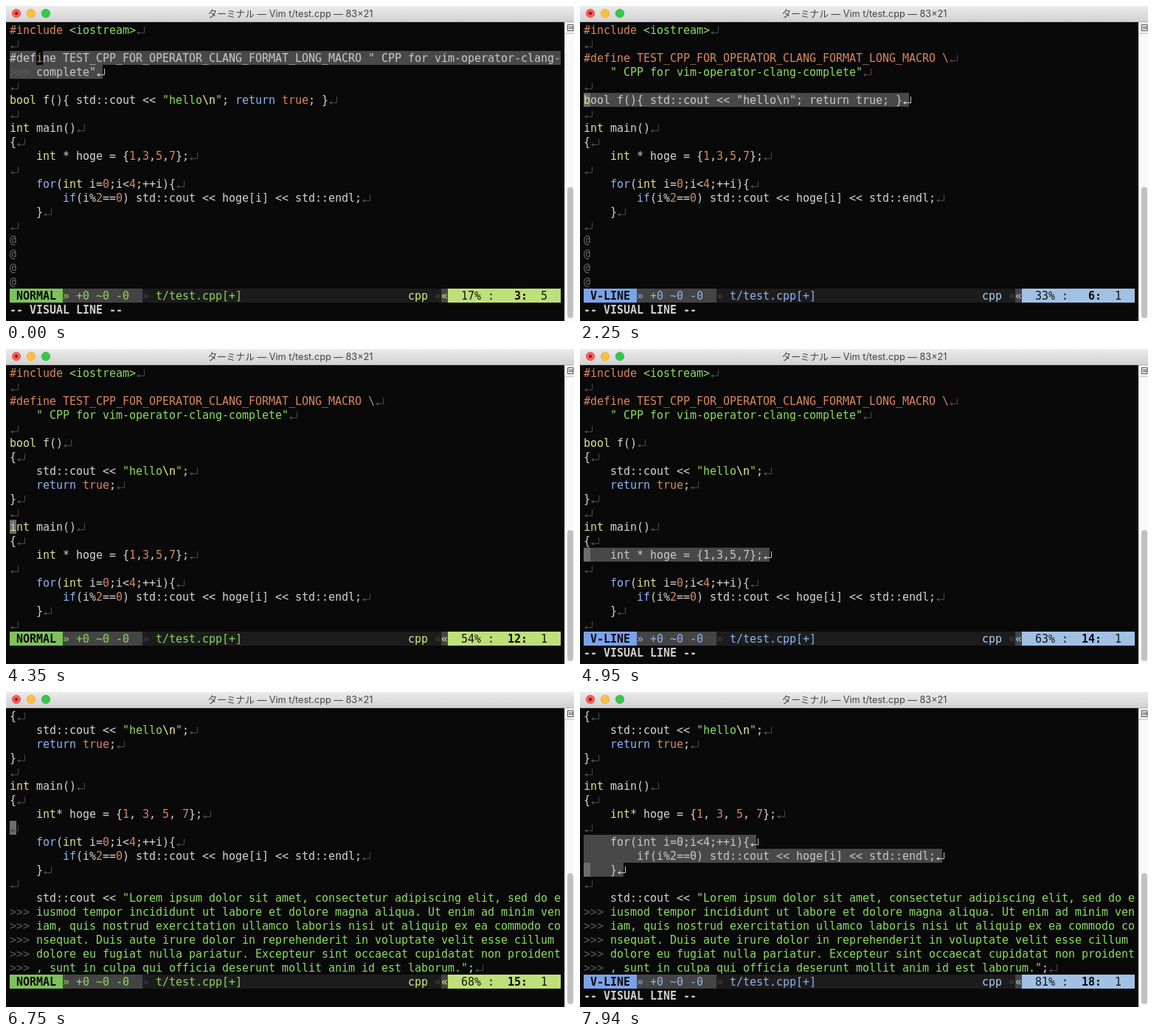
An HTML page that plays this animation: 770 px wide and 428 px high, repeating every 8 s.

```html
<!DOCTYPE html>
<html lang="ja">
<head>
<meta charset="utf-8">
<title>Vim clang-format</title>
<style>
  html, body { margin: 0; width: 100%; height: 100%; overflow: hidden; background: #090909; }
  svg { display: block; width: 770px; height: 428px; }
  #screen text {
    font: 15px "DejaVu Sans Mono", monospace;
    letter-spacing: -0.03px;
    font-variant-ligatures: none;
    white-space: pre;
  }
  #screen .bold { font-weight: bold; }
  #title { font: 12.7px Inter, "Noto Sans CJK JP", sans-serif; fill: #444; text-anchor: middle; }
</style>
</head>
<body>
<svg viewBox="0 0 770 428" width="770" height="428">
  <defs>
    <linearGradient id="bar" x2="0" y2="1">
      <stop offset="0" stop-color="#ebebeb"/>
      <stop offset="1" stop-color="#d2d2d2"/>
    </linearGradient>
  </defs>
  <rect width="770" height="428" fill="#090909"/>
  <g id="screen"></g>

  <rect width="770" height="21" fill="url(#bar)"/>
  <rect y="21" width="770" height="1" fill="#b4b4b4"/>
  <g stroke-width=".6">
    <circle cx="14" cy="10" r="5.8" fill="#fc5b57" stroke="#df4744"/>
    <circle cx="34" cy="10" r="5.8" fill="#fdbe41" stroke="#de9f34"/>
    <circle cx="54" cy="10" r="5.8" fill="#35c84a" stroke="#27aa35"/>
  </g>
  <circle cx="14" cy="10" r="2" fill="#7a0b08"/>
  <text id="title" x="385.5" y="14.5">ターミナル — Vim t/test.cpp — 83×21</text>

  <rect x="757" y="22" width="13" height="406" fill="#f9f9f9"/>
  <rect x="757" y="22" width="1" height="406" fill="#e2e2e2"/>
  <rect x="757" y="22" width="13" height="15" fill="#ececec"/>
  <rect x="757" y="37" width="13" height="1" fill="#c8c8c8"/>
  <path d="M761.5 25.5h7.5v8h-7.5zM763 28.5h6M763 30.5h6" fill="none" stroke="#555"/>
  <rect x="761" y="246" width="8" height="178" rx="4" fill="#c1c1c1"/>
</svg>
<script>
const LOOP = 8000, COLS = 83, ROWS = 19, CW = 9, RH = 19, LEFT = 5, TOP = 23;

const C = {
  bg: '#090909', plain: '#d4d4d4', pre: '#d7875f', type: '#dfdf8f', word: '#8fb4f4',
  str: '#8bdb62', esc: '#f0f0a0', dim: '#4a4a4a', wrap: '#5c5c5c', at: '#6c6c6c',
  sel: '#484848', selText: '#c8c8c8', cursor: '#6c6c6c', mid: '#444', line: '#1c1c1c'
};

const THEMES = {
  NORMAL: { mode: '#7ec25b', text: '#8ad55c', type: '#c8f07c', pos: '#bfe079' },
  'V-LINE': { mode: '#7ba3e8', text: '#8db3ee', type: '#a9cdf2', pos: '#a1c1e4' }
};

const RULES = [
  [/\b(?:int|bool)\b/g, C.type],
  [/\b(?:for|if|return)\b/g, C.word],
  [/\b(?:true|\d+)\b/g, C.pre],
  [/"[^"]*"|<iostream>/g, C.str],
  [/\\n/g, C.esc]
];

const LOREM = 'Lorem ipsum dolor sit amet, consectetur adipiscing elit, sed do eiusmod tempor ' +
  'incididunt ut labore et dolore magna aliqua. Ut enim ad minim veniam, quis nostrud ' +
  'exercitation ullamco laboris nisi ut aliquip ex ea commodo consequat. Duis aute irure ' +
  'dolor in reprehenderit in voluptate velit esse cillum dolore eu fugiat nulla pariatur. ' +
  'Excepteur sint occaecat cupidatat non proident, sunt in culpa qui officia deserunt ' +
  'mollit anim id est laborum.';

const MACRO = '#define TEST_CPP_FOR_OPERATOR_CLANG_FORMAT_LONG_MACRO ';
const MACRO_TEXT = '" CPP for vim-operator-clang-complete"';

// Buffer contents after the given number of formatting steps.
function buffer(step) {
  return [
    '#include <iostream>', '',
    ...(step > 0 ? [MACRO + '\\', '    ' + MACRO_TEXT] : [MACRO + MACRO_TEXT]), '',
    ...(step > 1
      ? ['bool f()', '{', '    std::cout << "hello\\n";', '    return true;', '}']
      : ['bool f(){ std::cout << "hello\\n"; return true; }']), '',
    'int main()', '{',
    step > 2 ? '    int* hoge = {1, 3, 5, 7};' : '    int * hoge = {1,3,5,7};', '',
    '    for(int i=0;i<4;++i){',
    '        if(i%2==0) std::cout << hoge[i] << std::endl;',
    '    }', '',
    '    std::cout << "' + LOREM + '";', '', '}'
  ];
}
const BUFFERS = [0, 1, 2, 3].map(buffer);

// Each entry: time, formatting step, cursor line, then optional settings.
const STATES = [
  [0, 0, 3, { anchor: 3, col: 5, off: true, mode: 'NORMAL' }],
  [150, 0, 3, { anchor: 3, col: 5 }],
  [1050, 1, 3],
  [1650, 1, 5],
  [1950, 1, 5, { off: true }],
  [2100, 1, 6],
  [2250, 1, 6, { anchor: 6 }],
  [3000, 2, 6],
  [3750, 2, 6, { off: true }],
  [3900, 2, 11],
  [4350, 2, 12],
  [4650, 2, 13],
  [4800, 2, 14],
  [4950, 2, 14, { anchor: 14 }],
  [5700, 3, 14],
  [6750, 3, 15, { top: 7 }],
  [6900, 3, 16, { top: 7 }],
  [7500, 3, 16, { top: 7, anchor: 16 }],
  [7640, 3, 17, { top: 7, anchor: 16 }],
  [7940, 3, 18, { top: 7, anchor: 16 }]
];

const x = col => LEFT + col * CW;
const y = row => TOP + row * RH;
const esc = s => s.replace(/&/g, '&amp;').replace(/</g, '&lt;');
const box = (col, row, n, fill) =>
  `<rect x="${x(col)}" y="${y(row)}" width="${n * CW}" height="${RH}" fill="${fill}"/>`;
const put = (col, row, s, fill, bold) =>
  `<text x="${x(col)}" y="${y(row) + 15}" fill="${fill}"${bold ? ' class="bold"' : ''}>${esc(s)}</text>`;
const eol = (col, row, color) =>
  `<path transform="translate(${x(col)} ${y(row)})" d="M11.5 5V13.5H2" fill="none" stroke="${color}"/>` +
  `<path transform="translate(${x(col)} ${y(row)})" d="M1 13.5l3.5-2.5v5z" fill="${color}"/>`;

// One cell per character, ending with the line-end mark.
function cells(line) {
  const colors = Array(line.length).fill(line[0] === '#' ? C.pre : C.plain);
  for (const [re, color] of RULES)
    for (const m of line.matchAll(re)) colors.fill(color, m.index, m.index + m[0].length);
  const list = [...line].map((ch, i) => ({ ch, color: colors[i] }));
  list.push({ ch: '', color: C.dim });
  return list;
}

function wrap(list) {
  const rows = [list.slice(0, COLS)];
  for (let i = COLS; i < list.length; i += COLS - 4)
    rows.push([...'>>> '].map(ch => ({ ch, color: C.wrap, mark: true }))
      .concat(list.slice(i, i + COLS - 4)));
  return rows;
}

function drawRow(row, list, selected, cursor) {
  let out = selected ? box(0, row, list.length, C.sel) : '';
  if (cursor) out += box(cursor.col, row, 1, cursor.off ? C.bg : C.cursor);
  const tint = (cell, i) =>
    selected && !cell.mark && !(cursor && cursor.col === i) ? C.selText : cell.color;
  for (let i = 0; i < list.length;) {
    const color = tint(list[i], i);
    if (!list[i].ch) { out += eol(i, row, color); i++; continue; }
    let run = '', start = i;
    while (i < list.length && list[i].ch && tint(list[i], i) === color) run += list[i++].ch;
    if (run.trim()) out += put(start, row, run, color);
  }
  return out;
}

function drawStatus(mode, line, col, total) {
  const t = THEMES[mode], r = ROWS;
  const percent = Math.floor(line * 100 / total);
  return box(0, r, COLS, C.line) +
    box(0, r, 8, t.mode) + put(1, r, mode, '#090909', true) +
    box(8, r, 12, C.mid) + put(8, r, '» +0 ~0 -0', t.text) +
    put(20, r, '»', C.mid) + put(22, r, 't/test.cpp[+]', t.text) +
    put(60, r, 'cpp', t.type) + put(64, r, '«', C.mid) +
    box(65, r, 1, C.mid) + put(65, r, '«', t.type) +
    box(66, r, 17, t.pos) + put(68, r, percent + '% :', '#151515') +
    put(74, r, String(line).padStart(3) + ':', '#090909', true) +
    put(80, r, String(col), '#151515');
}

function drawState([, step, line, opts = {}]) {
  const { anchor = 0, top = 1, col = 1, off = false } = opts;
  const mode = opts.mode || (anchor ? 'V-LINE' : 'NORMAL');
  const lines = BUFFERS[step];
  let out = '', row = 0;
  for (let n = top; n <= lines.length && row < ROWS; n++) {
    const rows = wrap(cells(lines[n - 1]));
    if (row + rows.length > ROWS) break;
    const selected = anchor > 0 && n >= anchor && n <= line;
    const here = n === line && (anchor || !off);
    rows.forEach((list, i) => {
      out += drawRow(row++, list, selected, here && i === 0 ? { col: col - 1, off } : null);
    });
  }
  while (row < ROWS) out += put(0, row++, '@', C.at);
  out += drawStatus(mode, line, col, lines.length);
  if (anchor) out += put(0, ROWS + 1, '-- VISUAL LINE --', '#cfcfcf', true);
  return out;
}

const screenEl = document.getElementById('screen');
let shown = null;

function render(ms) {
  const t = ms % LOOP;
  const state = STATES.findLast(s => s[0] <= t);
  if (state === shown) return;
  shown = state;
  screenEl.innerHTML = drawState(state);
}

const begin = performance.now();
function tick() {
  render(performance.now() - begin);
  requestAnimationFrame(tick);
}
tick();
</script>
</body>
</html>
```
